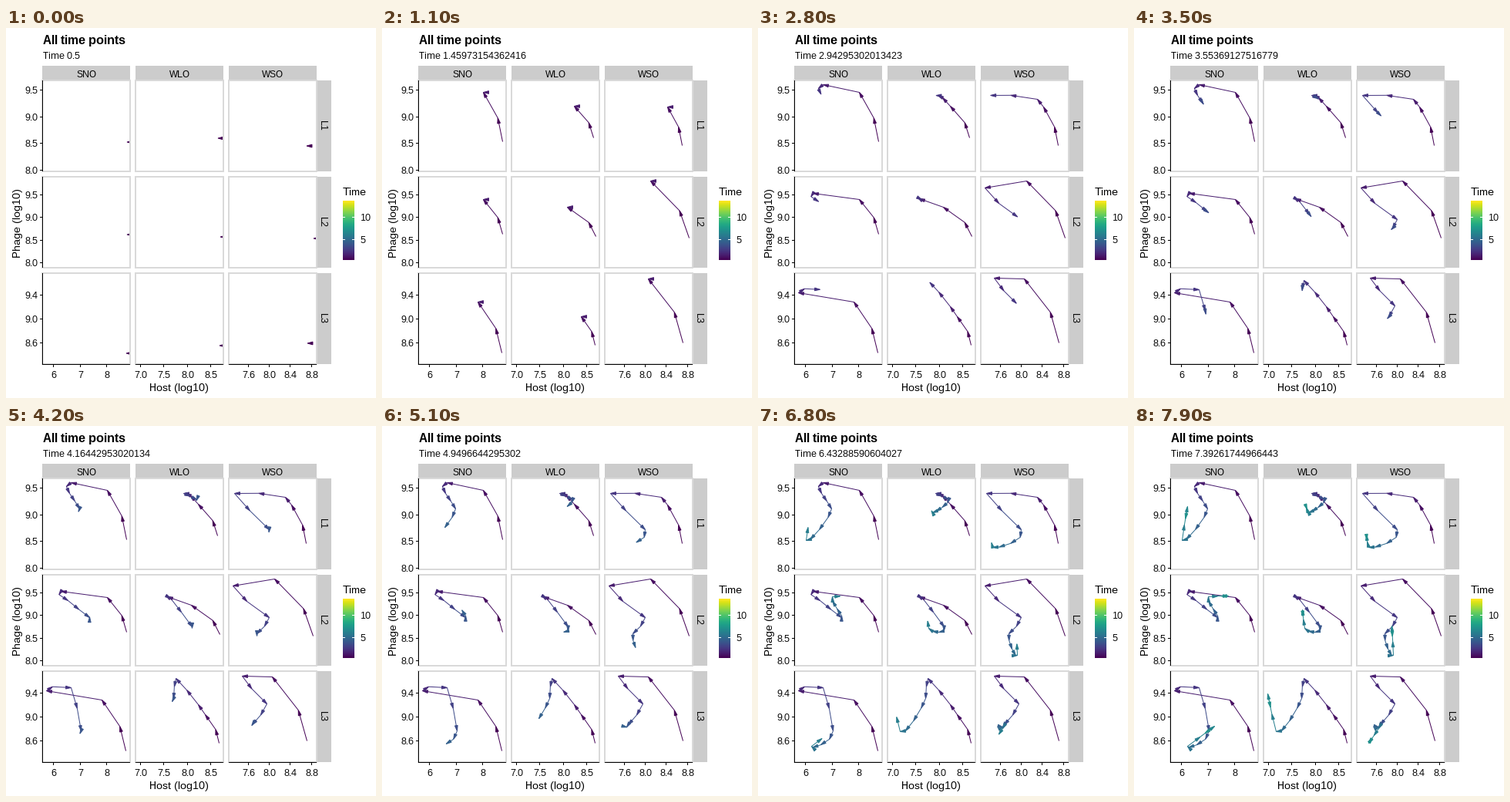
These frames come from a looping animation (480 px wide and 480 px high, 8 s). A matplotlib script:

```python
import numpy as np
import matplotlib.pyplot as plt
from matplotlib.animation import FuncAnimation
from matplotlib.collections import LineCollection, PolyCollection
from matplotlib.patches import Rectangle

plt.rcParams.update({
    "font.family": "Liberation Sans",
    "text.hinting": "native",
    "text.hinting_factor": 1,
})

SIZE, FRAMES, STEP_MS = 480, 80, 100
T0, T_SPAN, T_STEP = 0.5, 13.0, 13.0 / 149
PANEL_W, PANEL_H = 114, 118
COLS = {"SNO": 46.5, "WLO": 167.5, "WSO": 288.5}
ROWS = {"L1": 67.5, "L2": 192.5, "L3": 317.5}
HEAD_LEN, HEAD_ANGLE = 7.2, np.radians(15)
VIRIDIS = plt.get_cmap("viridis")

STEPS = np.arange(15)                      # one step is half a time unit
TIMES = T0 + 0.5 * STEPS
ARRIVALS = np.round(0.5 * STEPS / T_STEP)  # each step lands on a whole frame
KEY_STEPS = [0, 2, 3, 5, 7, 11, 13]
TENSION = 0.6

fig = plt.figure(figsize=(SIZE / 72, SIZE / 72), dpi=72, facecolor="white")
ax = fig.add_axes([0, 0, 1, 1])
ax.axis("off")


def label(x, y, s, size=12, **kw):
    kw.setdefault("va", "baseline")
    return ax.text(x, y, s, fontsize=size, **kw)


def line(x0, y0, x1, y1, color="black"):
    ax.plot([x0, x1], [y0, y1], color=color, lw=1, zorder=6, snap=False,
            solid_capstyle="butt")


def box(x, y, w, h, **kw):
    return ax.add_patch(Rectangle((x, y), w, h, snap=False, **kw))


def time_color(t):
    return VIRIDIS((t - T0) / T_SPAN)


def head(tip, angle):
    """Closed arrowhead with its tip at the given point."""
    a = angle + HEAD_ANGLE * np.array([1, -1])
    barbs = tip - HEAD_LEN * np.column_stack([np.cos(a), np.sin(a)])
    return np.vstack([barbs[0], tip, barbs[1]])


def fill_steps(keys):
    """Vertices at every step: a cubic curve through the key points."""
    slopes = TENSION * np.gradient(keys, KEY_STEPS, axis=0)
    pts = np.empty((len(STEPS), 2))
    for j, (a, b) in enumerate(zip(KEY_STEPS, KEY_STEPS[1:])):
        u = (np.arange(a, b + 1)[:, None] - a) / (b - a)
        pts[a:b + 1] = (keys[j] + (keys[j + 1] - keys[j]) * u**2 * (3 - 2 * u)
                        + (b - a) * u * (1 - u)
                        * (slopes[j] * (1 - u) - slopes[j + 1] * u))
    # at first x falls late while y rises evenly; the last step turns back
    pts[1] = pts[0] + (pts[2] - pts[0]) * [0.25, 0.48]
    pts[14] = pts[13] + 0.8 * (pts[12] - pts[13])
    return pts


class Track:
    """One panel's path, revealed over time."""

    def __init__(self, col, row, xs, ys):
        self.pts = fill_steps(np.column_stack([xs, ys]).astype(float))
        clip = box(COLS[col], ROWS[row], PANEL_W, PANEL_H,
                   fc="none", ec="none")
        self.lines = LineCollection([], linewidths=1, zorder=3)
        self.heads = PolyCollection([], linewidths=1, joinstyle="miter",
                                    zorder=3)
        for c in (self.lines, self.heads):
            c.set_snap(False)
            ax.add_collection(c, autolim=False)
            c.set_clip_path(clip)

    def reveal(self, i):
        n = np.count_nonzero(ARRIVALS <= i)
        now = [np.interp(i, ARRIVALS, self.pts[:, k]) for k in (0, 1)]
        path = np.vstack([self.pts[:n], now])
        d = np.diff(path, axis=0)
        angles = np.arctan2(d[:, 1], d[:, 0])
        # on arrival the newest step has no length and its head points left
        angles[np.hypot(d[:, 0], d[:, 1]) < 1e-6] = np.pi
        colors = time_color(TIMES[:n])
        self.lines.set_segments(list(zip(path[:-1], path[1:])))
        self.lines.set_color(colors)
        self.heads.set_verts([head(p, a) for p, a in zip(path[1:], angles)])
        self.heads.set_facecolor(colors)
        self.heads.set_edgecolor(colors)


# panels and strips
for name, x in COLS.items():
    box(x, 48.5, PANEL_W, 19, fc="#cccccc", ec="none")
    label(x + PANEL_W / 2, 63.5, name, ha="center")
    line(x, 436, x + PANEL_W, 436)
for name, y in ROWS.items():
    box(402.5, y, 19, PANEL_H, fc="#cccccc", ec="none")
    label(410, y + PANEL_H / 2, name, rotation=270, ha="center", va="center")
    line(47, y, 47, y + PANEL_H)
    for x in COLS.values():
        box(x, y, PANEL_W, PANEL_H, fc="none", ec="#d9d9d9", lw=2, zorder=5)

# axis ticks: first value, step, first pixel, pixels per step, count
for v, dv, x, dx, n in [(6, 1, 61, 34.6, 3),
                        (7, 0.5, 173.6, 30.5, 4),
                        (7.6, 0.4, 314, 27.2, 4)]:
    for i in range(n):
        px = round(x + i * dx)
        line(px, 436, px, 439.5)
        label(px, 453.5, f"{v + i * dv:.{0 if dv == 1 else 1}f}", ha="center")
for v, dv, y, dy, n in [(9.5, 0.5, 80, 34.6, 4),
                        (9.5, 0.5, 216, 29.4, 4),
                        (9.4, 0.4, 346, 31, 3)]:
    for i in range(n):
        py = round(y + i * dy)
        line(43.5, py, 47, py)
        label(41, py + 4.5, f"{v - i * dv:.1f}", ha="right")

# titles
label(47, 20.5, "All time points", 16, weight="bold")
subtitle = label(47, 39.5, "")
label(224.5, 470.5, "Host (log10)", 14, ha="center")
label(15, 252, "Phage (log10)", 14, rotation=90, ha="center", va="center")

# colour bar
label(436.5, 216.5, "Time", 14)
ax.imshow(np.linspace(1, 0, 77)[:, None], cmap=VIRIDIS, aspect="auto",
          extent=(436.5, 451.5, 300.5, 223.5), interpolation="nearest")
for v, y in ((10, 245), (5, 274)):
    line(436.5, y, 439.5, y, "white")
    line(448.5, y, 451.5, y, "white")
    label(459.5, y + 4.5, str(v))

# key points of each path, in pixels
tracks = [
    Track("SNO", "L1", [156, 131, 84, 82, 95, 62, 69],
          [147, 83, 73, 87, 107, 148, 104]),
    Track("SNO", "L2", [156, 131, 71, 80, 108, 96, 122],
          [267, 222, 214, 226, 248, 221, 220]),
    Track("SNO", "L3", [155, 124, 52, 84, 97, 69, 104],
          [421, 355, 343, 339, 395, 415, 389]),
    Track("WLO", "L1", [274, 249, 239, 230, 247, 226, 223],
          [142, 101, 90, 87, 95, 112, 105]),
    Track("WLO", "L2", [277, 240, 209, 213, 241, 221, 218],
          [270, 232, 221, 223, 260, 262, 238]),
    Track("WLO", "L3", [276, 258, 249, 220, 217, 184, 173],
          [411, 374, 361, 327, 353, 396, 347]),
    Track("WSO", "L1", [389, 370, 362, 296, 341, 304, 301],
          [152, 102, 92, 87, 134, 157, 141]),
    Track("WSO", "L2", [398, 348, 294, 341, 325, 336, 334],
          [272, 198, 207, 248, 269, 297, 259]),
    Track("WSO", "L3", [390, 345, 306, 338, 319, 317, 304],
          [408, 325, 324, 360, 387, 392, 411]),
]

# integer coordinates are pixel centres, y runs down
ax.set_xlim(-0.5, SIZE - 0.5)
ax.set_ylim(SIZE - 0.5, -0.5)


def draw(i):
    subtitle.set_text("Time %.15g" % (T0 + i * T_STEP))
    for track in tracks:
        track.reveal(i)
    return []


anim = FuncAnimation(fig, draw, frames=FRAMES, interval=STEP_MS,
                     repeat=True, repeat_delay=0, blit=False)
plt.show()
```
